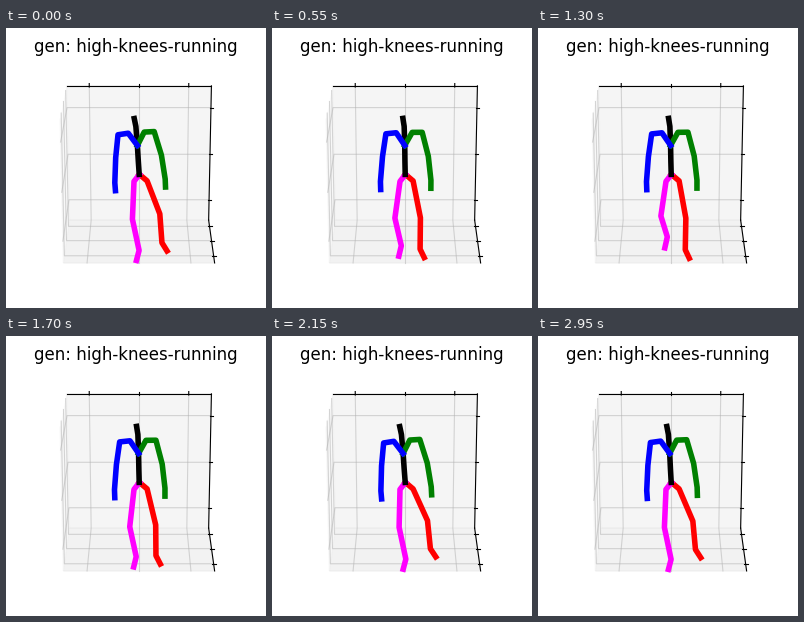
These frames come from a looping animation (260x280 px, 3 s). A matplotlib script:

```python
import numpy as np
import matplotlib.pyplot as plt
from matplotlib.animation import FuncAnimation
from matplotlib.patches import Polygon

W, H, DPI = 260, 280, 100
FRAMES, INTERVAL = 60, 50
STRIDE = 22  # frames per running cycle

fig = plt.figure(figsize=(W / DPI, H / DPI), dpi=DPI, facecolor="white")
ax = fig.add_axes([0, 0, 1, 1])
ax.set_xlim(0, W)
ax.set_ylim(H, 0)
ax.axis("off")

# ---- perspective box, seen from 20 degrees above ----
TILT = np.deg2rad(20)
HALF = np.array([0.5952, 0.5952, 0.4464])
SCALE, CENTER_X, CENTER_Y = 1243, 133, 144.5
TICKS = np.array([-1, 0, 1]) / 1.456


def project(x, y, z):
    """Map box coordinates in -1..1 to stage pixels."""
    px, py, pz = HALF * (x, y, z)
    depth = 10 - py * np.sin(TILT) - pz * np.cos(TILT)
    up = py * np.cos(TILT) - pz * np.sin(TILT)
    return CENTER_X + SCALE * px / depth, CENTER_Y - SCALE * up / depth


def path(*points, **style):
    xs, ys = zip(*(project(*p) for p in points))
    ax.plot(xs, ys, **style)


def pane(gray, *corners):
    ax.add_patch(Polygon([project(*c) for c in corners], closed=False,
                         color=(gray, gray, gray, 0.5), lw=1))


pane(0.95, (-1, 1, -1), (-1, -1, -1), (-1, -1, 1), (-1, 1, 1))
pane(0.90, (-1, -1, -1), (1, -1, -1), (1, -1, 1), (-1, -1, 1))
pane(0.925, (-1, 1, -1), (1, 1, -1), (1, -1, -1), (-1, -1, -1))

GRID = dict(color="#b0b0b0", lw=0.8, alpha=0.5)
EDGE = dict(color="black", lw=0.8)
for t in TICKS:
    path((t, 1, -1), (t, -1, -1), (t, -1, 1), **GRID)
    path((1, t, -1), (-1, t, -1), (-1, t, 1), **GRID)
    path((1, -1, t), (-1, -1, t), (-1, 1, t), **GRID)

path((-1, 1, -1), (1, 1, -1), **EDGE)
path((1, 1, -1), (1, -1, -1), **EDGE)
path((1, -1, -1), (1, -1, 1), **EDGE)
OUT, IN = 1 + 0.4 / 12, 1 - 0.2 / 12
for t in TICKS:
    path((t, OUT, -1), (t, IN, -1), **EDGE)
    path((OUT, t, -1), (IN, t, -1), **EDGE)
    path((OUT, -1, t), (IN, -1, t), **EDGE)

ax.text(129.9, 24.3, "gen: high-knees-running", ha="center", va="baseline",
        fontsize=12, family="DejaVu Sans")

# ---- runner ----
ROOT = np.array([133.2, 146.2])


def joints(*points):
    return np.array(points) + 0.4


SPINE = joints((132.8, 146), (132.6, 133), (132.5, 117), (132, 98), (130.8, 90))
CHEST = (132.5, 117)
RIGHT_ARM = joints(CHEST, (140, 104), (150, 104), (156, 128), (158.5, 152), (158.4, 160))
LEFT_ARM = joints(CHEST, (124, 104.3), (113.7, 105.3), (110.2, 128), (108, 153), (108.2, 161))

# root, hip, knee, ankle, toe: planted position and offset when raised
LEFT_LEG = joints((133, 146), (127.6, 153), (127.5, 191), (134.3, 223), (131.6, 233))
LEFT_RAISE = np.array([(0, 0), (0, 0), (-6.5, -5), (-7, -21.5), (-6.7, -20)])
RIGHT_LEG = joints((133, 146), (140.7, 152.5), (146.5, 190.5), (145.5, 222.5), (149.3, 231))
RIGHT_RAISE = np.array([(0, 0), (0, 0), (11, -8), (16, -13), (18, -13.5)])


def pulse(n, peak, sharp=1.0):
    """Smooth bump from 0 to 1, once per stride."""
    return (0.5 + 0.5 * np.cos(2 * np.pi * (n - peak) / STRIDE)) ** sharp


def tilt(points, angle):
    c, s = np.cos(angle), np.sin(angle)
    return ROOT + (points - ROOT) @ np.array([[c, -s], [s, c]])


COLORS = {"right leg": "red", "left leg": "magenta", "spine": "black",
          "right arm": "green", "left arm": "blue"}
lines = {k: ax.plot([], [], color=c, lw=4)[0] for k, c in COLORS.items()}


def update(n):
    lean = 0.07 * pulse(n, 19, 1.5)
    left = np.array([pulse(n, 7.5), pulse(n, 6.5, 3)])  # sideways, upwards
    right = pulse(n, 18.2, 1.5)
    body = {
        "spine": tilt(SPINE, lean),
        "right arm": tilt(RIGHT_ARM, lean),
        "left arm": tilt(LEFT_ARM, lean),
        "left leg": LEFT_LEG + LEFT_RAISE * left,
        "right leg": RIGHT_LEG + RIGHT_RAISE * right,
    }
    for name, pts in body.items():
        lines[name].set_data(pts[:, 0], pts[:, 1])
    return list(lines.values())


anim = FuncAnimation(fig, update, frames=FRAMES, interval=INTERVAL,
                     repeat=True, repeat_delay=0, blit=False)
plt.show()
```
